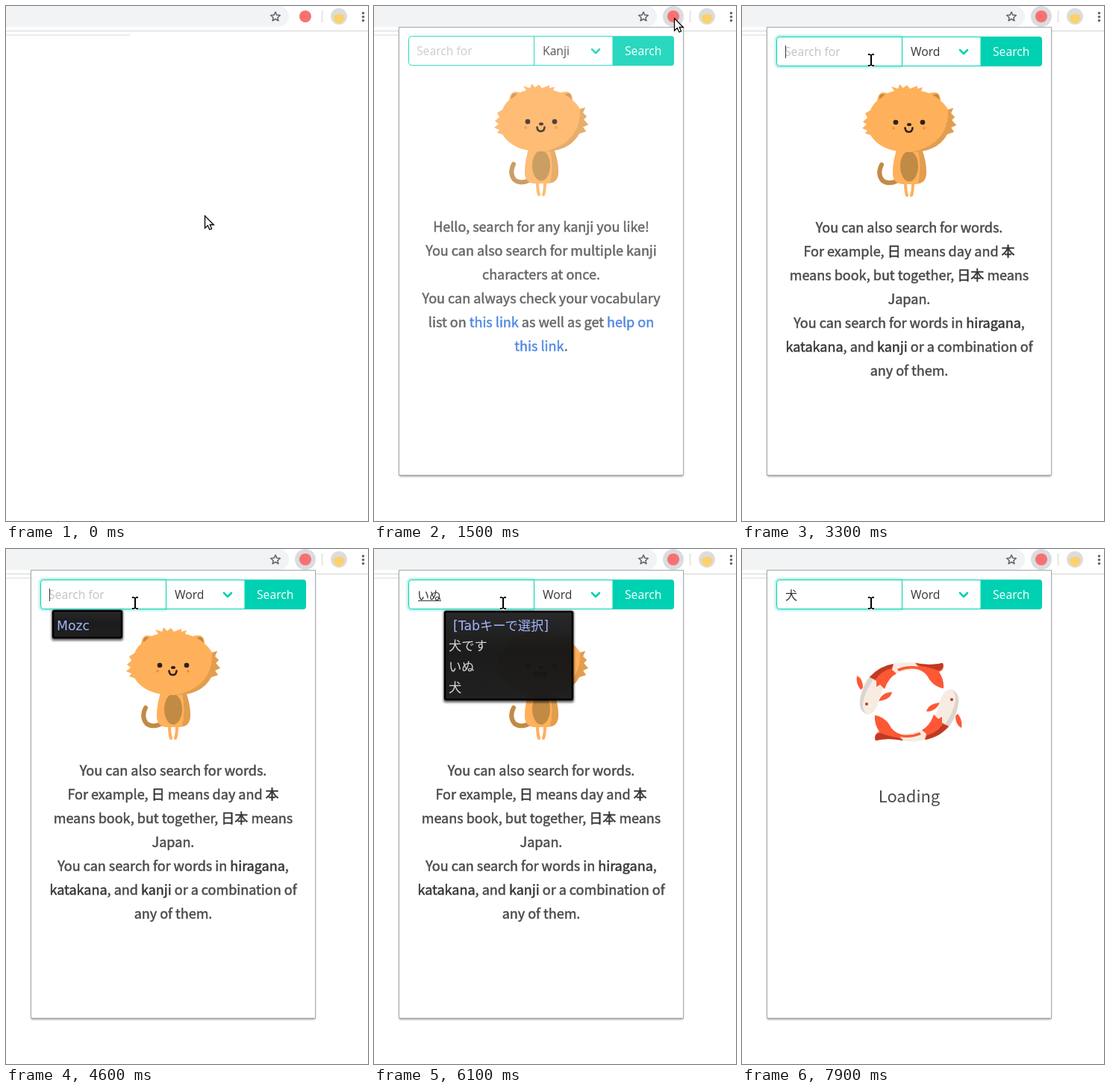
Recreate the animation shown at these times as an HTML page. Size 485 px wide and 691 px high, loop 8000 ms.

```html
<!DOCTYPE html>
<html lang="en">
<head>
<meta charset="utf-8">
<title>Kanji search popup</title>
<style>
  html, body { margin: 0; width: 100%; height: 100%; overflow: hidden; background: #fff; }
  svg { display: block; }
  text { white-space: pre; }
  .ui { font: 15.7px "Open Sans", "Noto Sans", "Noto Sans CJK JP", sans-serif; fill: #363636; }
  .info { font: 18px "Noto Sans CJK JP", "Noto Sans CJK", sans-serif; text-anchor: middle;
          fill: #4a4a4a; stroke: #4a4a4a; stroke-width: .5px; }
  .info .link { fill: #3273dc; stroke: #3273dc; }
  .info .strong { fill: #363636; stroke: #363636; }
  .typed { font: 16px "Noto Sans CJK JP", "Noto Sans CJK", sans-serif; }
  .ime { font: 17.3px "DejaVu Sans", "Noto Sans CJK JP", "Noto Sans CJK", sans-serif; fill: #d6d6d6; }
</style>
</head>
<body>
<svg width="485" height="691" viewBox="0 0 485 691">
  <defs>
    <filter id="soft" x="-20%" y="-20%" width="140%" height="140%"><feGaussianBlur stdDeviation="1.6"/></filter>
    <linearGradient id="gloss" x2="0" y2="1">
      <stop stop-color="#242424"/><stop offset=".45" stop-color="#161616"/><stop offset="1" stop-color="#1b1b1b"/>
    </linearGradient>
    <g id="fish">
      <path fill="#fd5836" d="M159 189Q152 180 154 170Q162 174 162 186ZM183 204Q188 192 201 192Q199 202 183 204Z"/>
      <path fill="#f6ece2" d="M168 222Q156 217 158 202Q162 174 182 161Q207 148 246 154L250 163Q224 160 207 167Q190 180 184 200Q180 221 168 222Z"/>
      <path fill="#dcd5cf" d="M168 222Q156 217 158 202Q162 182 173 169L177 173Q164 192 162 207Q161 217 168 222Z"/>
      <path fill="#fd5836" d="M171 172Q184 158 203 155L201 162L207 167Q196 173 191 188L185 182L180 185L180 177Z"/>
      <path fill="#bf3a22" d="M171 172Q184 157 203 154L200 160Q186 164 179 175Z"/>
      <path fill="#fd5836" d="M208 161Q223 155 236 158L232 153Q252 157 269 153Q272 162 264 165Q271 175 270 187Q258 185 251 175Q246 164 234 161Q222 159 210 164Z"/>
      <path fill="#bf3a22" d="M232 153Q252 157 269 153Q272 162 262 163Q250 158 239 157Z"/>
      <circle cx="167" cy="208" r="2" fill="#bf3a22"/>
    </g>
  </defs>

  <!-- browser bar -->
  <path fill="#f1f3f4" d="M0 0H365A14 14 0 0 1 365 28H0Z"/>
  <path fill="none" stroke="#5f6368" stroke-width="1.5" stroke-linejoin="round"
        d="M361 8L362.8 12.1L367.3 12.5L363.9 15.5L364.9 19.8L361 17.5L357.1 19.8L358.1 15.5L354.7 12.5L359.2 12.1Z"/>
  <path fill="#d4d4d4" d="M0 33H485V34H0ZM423 6H424V22H423Z"/>
  <path fill="#ececec" d="M0 38H166V40H0Z"/>
  <circle id="hover" cx="401" cy="14" r="14" fill="#dadce0"/>
  <circle cx="401" cy="14" r="8" fill="#f87171"/>
  <circle cx="446" cy="14" r="11" fill="#dcdcdc"/>
  <path fill="#fbd26a" d="M440 12Q446 9 452 12Q455 17 450 22Q446 25 442 22Q437 17 440 12Z"/>
  <g fill="#5f6368"><circle cx="478.500" cy="9.500" r="1.700"/><circle cx="478.500" cy="14.500" r="1.700"/><circle cx="478.500" cy="19.500" r="1.700"/></g>

  <g id="popup">
    <rect x="34" y="30" width="380" height="601" fill="#000" opacity=".45" filter="url(#soft)"/>
    <rect x="33.500" y="28.500" width="381" height="601" fill="#fff" stroke="#a9a9a9"/>
    <g id="content">
      <g fill="none" stroke="#00d1b2" stroke-opacity=".25" stroke-width="3">
        <rect id="inputGlow" x="45" y="40" width="171" height="42" rx="5"/>
        <rect id="selectGlow" x="213" y="40" width="108" height="42"/>
      </g>
      <path fill="#fff" stroke="#00d1b2" d="M214.500 41.500H50.500Q46.500 41.500 46.500 45.500V76.500Q46.500 80.500 50.500 80.500H214.500ZM214.500 41.500H320V80.500H214.500Z"/>
      <path fill="#00d1b2" d="M320 41H398Q402 41 402 45V77Q402 81 398 81H320Z"/>
      <text class="ui" x="336" y="67" style="fill:#fff">Search</text>
      <text class="ui" id="choice" x="226" y="67"></text>
      <path id="chevron" fill="none" stroke-width="2.600" stroke-linecap="round" stroke-linejoin="round" d="M292 59L297 64L302 59"/>
      <text class="ui" id="hint" x="57" y="67" style="fill:#c3c3c3">Search for</text>
      <text class="ui typed" id="typed" x="58" y="68"></text>
      <rect id="underline" x="59" y="69" height="1" fill="#363636"/>
      <rect id="caret" y="53" width="1" height="17" fill="#363636"/>

      <g id="lion">
        <path fill="none" stroke="#c18b46" stroke-width="6" stroke-linecap="round" d="M207 235Q196 240 188 234Q181 225 187 213"/>
        <path fill="none" stroke="#ffb05a" stroke-width="4" stroke-linecap="round" d="M219 236Q219 249 221 254M229 236Q229 249 227 254"/>
        <path fill="#ffb05a" d="M208 190H240Q247 208 247 224Q247 238 233 239H215Q201 238 202 222Q202 208 208 190Z"/>
        <path fill="#e29d4f" d="M236 194L241 192Q247 208 247 224Q246 237 236 238Q241 215 236 194Z"/>
        <ellipse cx="224" cy="215" rx="12" ry="20.500" fill="#c18b46"/>
        <path fill="#ffb05a" d="M181 136Q180 118 188 116Q196 115 204 122ZM266 136Q268 118 260 116Q250 115 243 122Z"/>
        <path fill="#c18b46" d="M184 132Q182 118 188 118Q194 119 198 125ZM264 132Q266 118 260 118Q253 119 249 125Z"/>
        <path fill="#ffb05a" d="M172 173L165 171L168 167L161 164L167 159L162 155L168 150L165 144L172 140Q176 129 187 123Q194 116 204 114L200 108L209 111L211 105L216 110L221 106L225 111L235 107L235 111L242 109L240 114Q256 117 266 127Q273 133 276 139L283 137L280 144L285 149L281 153L287 160L280 163L284 169L275 172Q262 196 224 196Q186 196 172 173Z"/>
        <path fill="#e29d4f" d="M276 139L283 137L280 144L285 149L281 153L287 160L280 163L284 169L275 172Q262 196 228 196Q278 184 276 139Z"/>
        <g fill="#2b2119"><circle cx="206" cy="156" r="3.300"/><circle cx="242" cy="156" r="3.300"/><ellipse cx="224" cy="159" rx="3" ry="2"/></g>
        <g fill="#e88c48"><circle cx="203" cy="164" r="1.800"/><circle cx="244" cy="164" r="1.800"/></g>
        <path id="smile" fill="none" stroke="#2b2119" stroke-width="2.600" stroke-linecap="round" d="M218.500 163.500Q219 169 223.500 169Q228 169 228.500 163.500"/>
        <g id="laugh">
          <path fill="#2b2119" d="M213 163Q223 167 233 163Q233 175 223 175Q213 175 213 163Z"/>
          <path fill="#d9604f" d="M217 172Q223 167 229 172Q223 177 217 172Z"/>
        </g>
      </g>
      <g class="info" id="kanjiInfo"></g>
      <g class="info" id="wordInfo"></g>

      <g id="loading">
        <g id="spinner"><use href="#fish"/><use href="#fish" transform="rotate(180 224 205)"/></g>
        <text class="info" x="224" y="340" style="font-size:22px;stroke:none">Loading</text>
      </g>

      <g id="menu">
        <rect x="214.500" y="81.500" width="105" height="62" fill="#fff" stroke="#767676"/>
        <rect id="mark" x="216" width="103" height="18" fill="#1e90ff" stroke="#000" stroke-width="2"/>
        <text class="ui" x="226" y="97">Kanji</text>
        <text class="ui" x="226" y="117">Word</text>
        <text class="ui" x="226" y="137">English</text>
      </g>
    </g>
  </g>
  <g id="ime" class="ime"></g>
  <path id="arrow" fill="#fff" stroke="#000" stroke-width="1.300" d="M.5 .5V17L4.300 13.500L6.800 19L9.600 17.800L7.200 12.500H12.300Z"/>
  <g id="beam" fill="none">
    <path stroke="#fff" stroke-width="4" d="M-4 -7H4M0 -7V8M-4 8H4"/>
    <path stroke="#000" stroke-width="2" d="M-4 -7H-1M1 -7H4M0 -7V8M-4 8H-1M1 8H4"/>
  </g>
</svg>

<script>
const LOOP = 8000, STEP = 100;
const $ = id => document.getElementById(id);
const show = (id, on) => $(id).style.display = on ? '' : 'none';
const set = (id, attrs) => { for (const k in attrs) $(id).setAttribute(k, attrs[k]); };
const clamp = v => Math.max(0, Math.min(1, v));
const latest = (list, t) => list.filter(s => s[0] <= t).pop();

// _x_ marks a link, *x* a strong word
function paragraph(id, lines) {
  $(id).innerHTML = lines.map((line, i) => `<text x="224" y="${304 + 32 * i}">` + line
    .replace(/_(.+?)_/g, '<tspan class="link">$1</tspan>')
    .replace(/\*(.+?)\*/g, '<tspan class="strong">$1</tspan>') + '</text>').join('');
}
paragraph('kanjiInfo', [
  'Hello, search for any kanji you like!',
  'You can also search for multiple kanji',
  'characters at once.',
  'You can always check your vocabulary',
  'list on _this link_ as well as get _help on_',
  '_this link_.'
]);
paragraph('wordInfo', [
  'You can also search for words.',
  'For example, *日* means day and *本*',
  'means book, but together, *日本* means',
  'Japan.',
  'You can search for words in *hiragana*,',
  '*katakana*, and *kanji* or a combination of',
  'any of them.'
]);

// time, x, y
const path = [[0, 266, 281], [900, 402, 16], [1500, 402, 16], [2200, 258, 54], [2300, 258, 54],
  [2700, 251, 105], [2800, 251, 105], [3300, 173, 72], [LOOP, 173, 72]];
function pointer(t) {
  const i = path.findIndex(p => p[0] > t), [t0, x0, y0] = path[i - 1], [t1, x1, y1] = path[i];
  const u = (t - t0) / (t1 - t0), e = u * u * (3 - 2 * u);
  return [x0 + (x1 - x0) * e, y0 + (y1 - y0) * e];
}

// time, text, caret x (0 = hidden)
const typing = [[0, '', 0], [3300, '', 58], [4000, '', 0], [4500, '', 58], [4900, 'い', 74],
  [5100, 'いn', 84], [5500, 'いぬ', 90], [6100, 'いぬ', 0], [6500, '犬です', 58], [6700, 'いぬ', 58],
  [6900, '犬', 58], [7300, '犬', 74], [7600, '犬', 0]];

// time, x, width, heading, candidates, selected
const tab = '[Tabキーで選択]', dog = ['犬です', 'いぬ', '犬'];
const erase = n => `[${n}/3]  Ctrl+Delで履歴から削除`;
const windows = [[0], [4500, 62, 93, 'Mozc', []], [4900],
  [5000, 78, 172, tab, ['いい', 'いつ', '今']],
  [5100, 86, 260, tab, ['インフォメーション', 'いんげん豆のスープです', '犬です']],
  [5500, 94, 172, tab, dog], [6500, 94, 332, erase(1), dog, 0], [6600, 62, 332, erase(1), dog, 0],
  [6700, 62, 332, erase(2), dog, 1], [6900, 62, 172, '[3/3]', dog, 2], [7200]];

function candidateWindow([, x, w, head, items, picked]) {
  if (!x) return '';
  const y = items.length ? 83 : 82, h = items.length ? 120 : 38, numbered = picked !== undefined;
  const rows = items.map((item, i) => {
    const base = 136 + 28 * i, fill = i === picked ? '#6088e8' : '#d6d6d6';
    const number = numbered ? `<text x="${x + 6}" y="${base - 4}" fill="#aaa">${i + 1}.</text>` : '';
    return number + `<text x="${x + (numbered ? 23 : 6)}" y="${base}" style="fill:${fill}">${item}</text>`;
  }).join('');
  return `<rect x="${x - 1}" y="${y}" width="${w + 3}" height="${h + 3}" rx="3" opacity=".6" fill="#000" filter="url(#soft)"/>
    <rect x="${x + 1}" y="${y + 1}" width="${w - 1}" height="${h - 2}" rx="2" fill="url(#gloss)" fill-opacity=".93" stroke="#000" stroke-width="2.5"/>
    <text x="${x + (items.length ? 12 : 6)}" y="109" style="fill:#a5b4fb">${head}</text>${rows}`;
}

let openWindow;
function draw(t) {
  const [x, y] = pointer(t), [, text, caret] = latest(typing, t);
  const word = t >= 2900, menu = t >= 2300 && !word, loading = t >= 7600;
  const overSelect = x > 214 && x < 320 && y > 41 && y < 81;

  set('hover', { opacity: clamp((t - 700) / 300) });
  show('popup', t >= 1400);
  const fade = clamp((t - 1400) / 120);
  set('content', { opacity: fade, transform: `translate(0 ${(fade - 1) * 5})` });

  show('inputGlow', t >= 3300);
  show('selectGlow', menu);
  $('choice').textContent = word ? 'Word' : 'Kanji';
  set('chevron', { stroke: menu || overSelect ? '#363636' : '#00d1b2' });
  show('menu', menu);
  const row = y < 100 ? 0 : 1;
  set('mark', { y: 83 + 20 * row });
  document.querySelectorAll('#menu text').forEach((el, i) => el.style.fill = i === row ? '#fff' : '');

  show('hint', !text);
  $('typed').textContent = text;
  set('underline', { width: t >= 4900 && t < 7300 ? (text === 'いn' ? 25 : 16 * text.length - 1) : 0 });
  show('caret', caret);
  set('caret', { x: caret });

  show('lion', !loading);
  show('smile', !text);
  show('laugh', text);
  show('kanjiInfo', !word);
  show('wordInfo', word && !loading);
  show('loading', loading);
  set('spinner', { transform: `rotate(${(7900 - t) * .1} 224 205)` });

  const win = latest(windows, t);
  if (win !== openWindow) $('ime').innerHTML = candidateWindow(openWindow = win);

  const inInput = word && x < 214 && y < 81;
  show('arrow', !inInput);
  show('beam', inInput);
  for (const id of ['arrow', 'beam']) set(id, { transform: `translate(${x} ${y})` });
}

const start = performance.now();
function frame() {
  const t = (performance.now() - start) % LOOP;
  draw(Math.floor(t / STEP) * STEP);
  requestAnimationFrame(frame);
}
frame();
</script>
</body>
</html>
```
